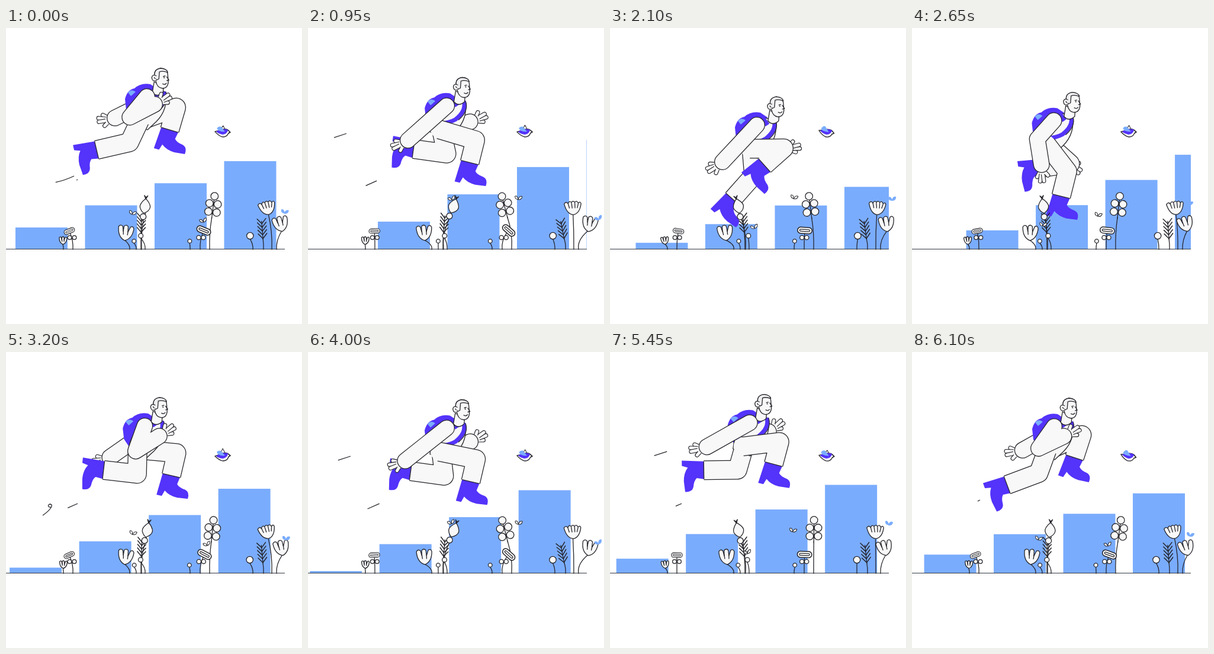
Recreate the animation shown at these times as an HTML page with a canvas. Size 500x500 px, loop 6150 ms.

```html
<!DOCTYPE html>
<html>
<head>
<meta charset="utf-8">
<style>
html, body { margin: 0; width: 100%; height: 100%; overflow: hidden; background: #fff; }
canvas { display: block; width: 500px; height: 500px; }
</style>
</head>
<body>
<canvas id="stage" width="500" height="500"></canvas>
<script>
const g = document.getElementById('stage').getContext('2d');
const LOOP = 6150, STEP = LOOP / 8, GAP = 117.5, GROUND = 374;
const INK = '#26262c', PAPER = '#f8f8f8', VIOLET = '#5433fa', SKY = '#7aacfd';
const TAU = Math.PI * 2;
const { sin, cos, atan2, hypot, max, min } = Math;
const clamp = (v, lo, hi) => max(lo, min(hi, v));
let unit = 1;

// Smooth periodic curve through a few [time, x, y] poses.
function spline(keys, time, period) {
  const n = keys.length;
  const t = (time % period + period) % period;
  let i = n - 1;
  while (keys[i][0] > t) i--;
  const [a, b, c, d] = [-1, 0, 1, 2].map(o => {
    const [k, ...v] = keys[(i + o + n) % n];
    return { t: k + Math.floor((i + o) / n) * period, v };
  });
  const h = c.t - b.t, s = (t - b.t) / h;
  return b.v.map((v, j) => {
    const w = c.v[j];
    const m = (w - a.v[j]) / (c.t - a.t) * h;
    const q = (d.v[j] - v) / (d.t - b.t) * h;
    return v + s * (m + s * (3 * (w - v) - 2 * m - q + s * (2 * (v - w) + m + q)));
  });
}

function shape(d, fill, line = INK, width = 1.3) {
  const p = new Path2D(d);
  if (fill) { g.fillStyle = fill; g.fill(p); }
  if (line) { g.strokeStyle = line; g.lineWidth = width / unit; g.stroke(p); }
}

function disc(x, y, r, fill = PAPER, line = INK) {
  g.beginPath();
  g.arc(x, y, r, 0, TAU);
  g.fillStyle = fill;
  g.fill();
  if (line) { g.strokeStyle = line; g.lineWidth = 1.3 / unit; g.stroke(); }
}

function placed(x, y, angle, draw, size = 1) {
  g.save();
  g.translate(x, y);
  g.rotate(angle);
  g.scale(size, size);
  unit = size;
  draw();
  unit = 1;
  g.restore();
}

// Outlined tube through points.
function tube(pts, width, cap = 'round') {
  g.lineCap = cap;
  g.lineJoin = 'round';
  g.beginPath();
  pts.forEach(p => g.lineTo(...p));
  g.strokeStyle = INK;
  g.lineWidth = width;
  g.stroke();
  g.strokeStyle = PAPER;
  g.lineWidth = width - 2.5;
  g.stroke();
}

// ---- staircase: slides left and tilts with each stride ----
function bars(u) {
  const left = 20 + 9.5 * cos(TAU * (u - .32)) - GAP * u;
  const lift = 33 * (.5 + .5 * cos(TAU * u)) ** 5 - 1;
  const slope = .33 + .065 * cos(TAU * (u - .28));
  g.save();
  g.beginPath();
  g.rect(0, 0, 471, 500);
  g.clip();
  g.fillStyle = SKY;
  for (let x = left; x < 471; x += GAP) {
    const h = max(0, lift + slope * x);
    g.fillRect(x, GROUND - h, 88, h);
  }
  g.restore();
  g.fillStyle = '#333942';
  g.fillRect(0, GROUND - 1, 471, 1);
}

// ---- runner ----
// Each limb cycles over two strides; the far limbs run one stride behind.
const bodyPath = [[0, 4, -14], [.22, 0, 0], [.5, 7, 31], [.732, 14, 34], [.935, 6, -4]];
const anklePath = [
  [0, -73, 50], [.2, -52, 33], [.47, -10, 40], [.732, 25, 28],
  [.96, 45, 13], [1.2, 53, 50], [1.45, 24, 88], [1.732, -32, 85]
];
const wristPath = [
  [0, 13, 13], [.22, 26, 23], [.5, 0, 72], [.732, -58, 62],
  [1, -68, 34], [1.2, -70, 55], [1.5, -10, 74], [1.732, 30, 38]
];

// Middle joint of a two-part limb.
function bend(dx, dy, a, b, side) {
  const d = hypot(dx, dy);
  const along = (a * a + d * d - b * b) / (2 * d);
  const out = side * Math.sqrt(max(0, a * a - along * along));
  return [(dx * along + dy * out) / d, (dy * along - dx * out) / d];
}

function boot() {
  shape('M-15 0L15 0L13 12Q17 17 28 18Q37 20 36 32L18 34Q4 34 -5 27L-8 37L-17 37Z', VIOLET, null);
  shape('M-15 0L15 0', null);
}

function leg(c, x, y) {
  const [dx, dy] = spline(anklePath, c, 2);
  const front = clamp(dx / 50, -1, 1);
  const [kx, ky] = bend(dx, dy, 52 + 11 * front, 48 - 9 * front, 1);
  tube([[x, y], [x + kx, y + ky], [x + dx, y + dy]], 33, 'butt');
  disc(x, y, 15, PAPER, null);
  placed(x + dx, y + dy, atan2(dy - ky, dx - kx) - TAU / 4, boot);
}

function hand() {
  for (const [y, len] of [[8, 17], [2, 25], [-5, 24], [-12, 13]]) tube([[5, y * .3], [len, y]], 8);
  shape('M-8 -8Q2 -11 10 -7Q14 0 10 6Q0 12 -8 8Z', PAPER, null);
}

function arm(c, x, y) {
  const [dx, dy] = spline(wristPath, c, 2);
  const part = 45 + 8 * clamp(dx / 50, -1, 0);
  const [ex, ey] = bend(dx, dy, part, part + 2, -1);
  const a = atan2(dy - ey, dx - ex);
  placed(x + dx + 6 * cos(a), y + dy + 6 * sin(a), a + .26 * (1 - cos(a)), hand, .9);
  tube([[x, y], [x + ex, y + ey], [x + dx, y + dy]], 28);
}

function pack() {
  shape('M197 134Q201 118 213 116Q224 106 240 109L252 117L240 150L207 164L199 152Z', VIOLET, null);
  shape('M202 123Q208 116 215 122L207 129Z', SKY, null);
}

function torso() {
  shape('M245 117C224 124 208 150 206 174L235 186L250 172C264 158 269 140 265 122Z', PAPER);
  shape('M263 122Q268 138 249 153Q233 162 212 158', null, VIOLET, 7);
  shape('M266 122Q272 139 254 154', null);
  shape('M243 117L252 130', null, VIOLET, 8);
}

function head() {
  shape('M249 105L246 123Q254 132 264 123L265 113Z', PAPER);
  shape('M250 95Q248 84 260 82Q271 83 272 92L273 105Q272 116 263 116Q254 115 252 104Z', PAPER);
  shape('M250 95Q248 84 260 82Q271 83 272 89Q264 86 258 88L257 100L253 102Z', '#efeff1');
  shape('M253 95Q246 91 245 98Q246 105 252 103', PAPER);
  shape('M249 97L251 100M264 96L268 95M270 96L274 102L270 103M263 108Q267 111 270 107', null);
  disc(266, 98, 1, INK, null);
}

function runner(c) {
  const [x, y] = spline(bodyPath, c, 1);
  arm(c + 1, x + 248, y + 132);
  placed(x, y, 0, pack);
  leg(c + 1, x + 225, y + 170);
  placed(x, y, 0, torso);
  leg(c, x + 222, y + 170);
  placed(x + y * .2, y, 0, head);
  arm(c, x + 234, y + 130);
}

// ---- plants ----
// sway: share of the height, turn: head rotation per px, stem: stem end below the head
const kinds = {
  tulip: { sway: .17, turn: .035, stem: 12, droops: true, draw() {
    shape('M-13 -9Q-10 -14 -6 -10L-4 -2L-4 -11Q0 -15 3 -11L4 -2L7 -11Q11 -14 13 -9Q13 8 1 13Q-12 9 -13 -9Z', PAPER);
    shape('M-4 -4L-3 3M4 -4L4 3', null);
  } },
  crown: { sway: .09, turn: .026, stem: 11, draw() {
    shape('M-15 -8Q-11 -13 -8 -8Q-6 -14 -2 -10Q1 -14 4 -10Q8 -14 10 -8Q14 -12 15 -7Q12 10 1 12Q-11 11 -15 -8Z', PAPER);
    shape('M-8 -8L-6 0M-2 -9L-1 0M4 -9L4 0M10 -7L8 0', null);
  } },
  pill: { sway: .17, turn: .065, stem: 5, draw() {
    g.lineCap = 'round';
    for (const [w, color] of [[12, INK], [9, PAPER], [4.5, INK], [2, '#fff']]) shape('M-7 0L7 0', null, color, w * unit);
  } },
  dot: { sway: .16, turn: 0, stem: 6, draw() { disc(0, 0, 6); } },
  fern: { sway: .06, turn: .035, stem: 15, draw() {
    for (let y = -11; y < 16; y += 6) shape(`M-7 ${y - 6}L0 ${y + 2}L7 ${y - 6}`, null, INK, 1.5);
    shape('M0 -13L0 16', null);
  } },
  bulb: { sway: .22, turn: .02, stem: 22, draw() {
    shape('M0 -13Q-10 -3 -8 3Q-5 10 0 12Q9 7 9 0Q8 -6 0 -13Z', PAPER);
    shape('M0 -12L-3 -18L0 -15L3 -18Z', INK);
    disc(-1, 18, 5);
  } },
  cluster: { sway: .16, turn: .02, stem: 22, draw() {
    shape('M0 -14L0 24M-6 0L6 0M-6 14L6 14', null);
    disc(0, -14, 6.3);
    for (const y of [-1, 13]) [-7, 7].forEach(x => disc(x, y, 6.3));
  } }
};

function plant(t, kind, base, rest, y, size, phase) {
  const k = kinds[kind], wave = TAU * t / (LOOP / 2);
  const x = rest + k.sway * (GROUND - y) * sin(wave + phase);
  const a = (x - (k.droops ? rest : base)) * k.turn;
  const sx = x - sin(a) * k.stem * size, sy = y + cos(a) * k.stem * size;
  shape(`M${base} ${GROUND}Q${base - (x - base) * .15} ${(GROUND + sy) / 2} ${sx} ${sy}`, null);
  if (kind === 'pill') [-4, 4].forEach(o => disc(base + (x - base) * .25 + o, 354, 2.6 + size));
  placed(x, y, a, k.draw, size);
}

function garden(t) {
  plant(t, 'tulip', 97, 95, 359, .5, .5);
  plant(t, 'pill', 113, 112, 343, .75, -1.9);
  plant(t, 'tulip', 209, 197, 346, 1, 1.4);
  plant(t, 'dot', 220, 218, 360, .55, -.9);
  plant(t, 'fern', 228, 228, 330, 1, .2);
  plant(t, 'bulb', 229, 232, 301, 1, .17);
  plant(t, 'dot', 235, 231, 351, .65, -2);
  plant(t, 'dot', 311, 310, 360, .55, -3.3);
  plant(t, 'cluster', 344, 339, 298, 1, 1.9);
  plant(t, 'pill', 328, 334, 342, 1, 0);
  plant(t, 'dot', 417, 415, 351, .95, -2.3);
  plant(t, 'fern', 435, 431, 340, 1.05, 2);
  plant(t, 'crown', 449, 447, 304, .95, -1.9);
  plant(t, 'tulip', 457, 469, 331, 1, -.85);
}

// ---- butterflies and bird ----
function butterfly(x, y, fill, line = INK) {
  placed(x, y, .3 * sin(x / 8), () =>
    shape('M0 3Q-6 3 -6 -2Q-2 -4 0 3Q1 -4 6 -3Q6 3 0 3Z', fill, line, 1));
}

function butterflies(t) {
  const a = TAU * t / (LOOP / 2);
  butterfly(235 - 21 * cos(a), 312 - 26 * sin(a), PAPER);
  butterfly(333 + 24 * sin(a), 297 + 28 * cos(a), PAPER);
  butterfly(480 + 12 * sin(a - .87), 306 + 18 * sin(a + .23), SKY, SKY);
}

function bird(t) {
  const up = (.5 + .5 * cos(TAU * (t * 20 / LOOP - .335))) ** .3;
  placed(366, 174, .25 * (1 - up), () => {
    shape(`M6 0L0 ${-5 - 6 * up}L-5 0Z`, PAPER, up > .3 ? INK : null, 1);
    shape('M-13 2L-7 0Q2 -5 8 -3L13 1L10 3Q8 10 0 10Q-7 8 -13 2Z', PAPER);
    shape('M-11 2Q-3 -5 9 -3Q8 5 0 6Q-7 5 -11 2Z', VIOLET, null);
    shape(`M4 1Q-8 2 -10 ${-1 - 4 * up}Q-8 -8 ${-4 + up} -7Z`, SKY, null);
    shape('M9 -2L13 1L10 3', null);
  });
}

// ---- wind streaks trailing each jump ----
function streak(d, from, to) {
  if (to <= from) return;
  g.save();
  g.lineCap = 'butt';
  g.setLineDash([to - from, 999]);
  g.lineDashOffset = -from;
  shape(d, null);
  g.restore();
}

function wind(c) {
  const odd = c > .9 && c < 1.9;
  const u = (c + .1) % 1 - .1;
  if (u > .36) return;
  const tail = max(0, u - .03), tip = u + .075;
  if (odd) streak('M109 164L41 186', tail * 225, min(71, tip * 220));
  else streak('M115 250Q98 258 82 261C70 265 69 257 75 257C81 258 75 267 62 276', tail * 300, min(88, tip * 440));
  if (u >= 0) streak('M121 256L96 267', max(0, u - .2) * 150, min(26, 2 + u * 100));
}

function draw(now) {
  const t = Math.floor(now / 50) * 50 % LOOP;
  const c = t / STEP % 2;
  g.fillStyle = '#fff';
  g.fillRect(0, 0, 500, 500);
  bars(c % 1);
  wind(c);
  runner(c);
  g.lineCap = g.lineJoin = 'round';
  garden(t);
  butterflies(t);
  bird(t);
}

let start;
function tick(now) {
  start ??= now;
  draw(now - start);
  requestAnimationFrame(tick);
}
draw(0);
requestAnimationFrame(tick);
</script>
</body>
</html>
```
